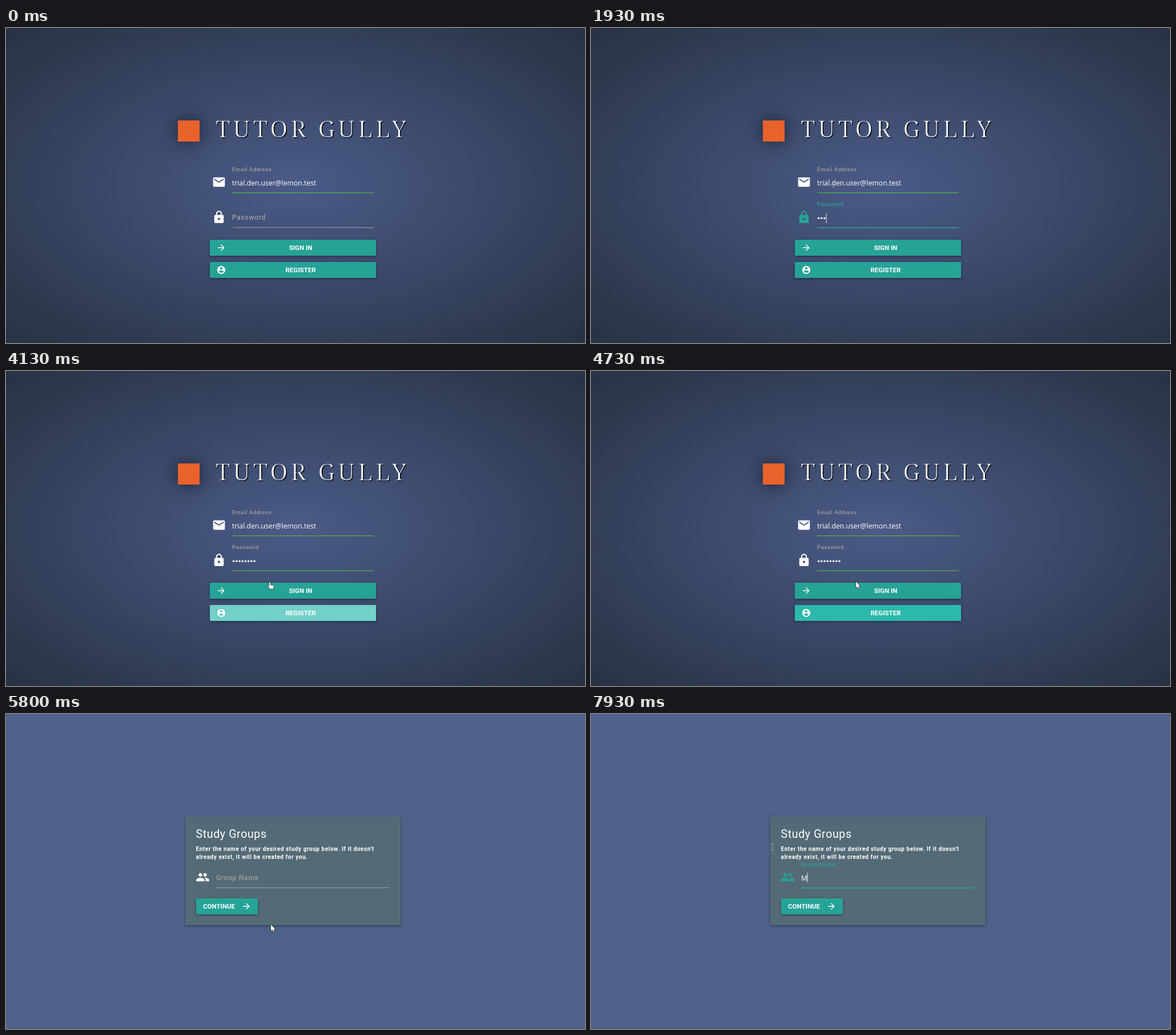
Recreate the animation shown at these times as an HTML page with a canvas. Size 1014 px wide and 552 px high, loop 8 s.

```html
<!DOCTYPE html>
<html lang="en">
<head>
<meta charset="utf-8">
<title>Sign in</title>
<style>
  html, body { margin: 0; width: 100%; height: 100%; overflow: hidden; background: #28324a; }
  canvas { display: block; }
</style>
</head>
<body>
<canvas id="stage" width="1014" height="552"></canvas>
<script>
const ctx = document.getElementById('stage').getContext('2d');
const LOOP = 8000, FOCUS = 926, TYPE = 1650, CLICK = 3700, PAGE = 5800, GROUP_FOCUS = 6700, KEY = 7930;
const WHITE = [255, 255, 255], GREY = [158, 158, 158], TEAL = [38, 163, 151], GREEN = [76, 165, 80];
const HOVER = [43, 185, 172];
const UI = '12.2px "Open Sans", sans-serif';
const LABEL = '500 12px Roboto, sans-serif';
const BUTTON = 'bold 11.5px Roboto, sans-serif';

const ICONS = {
  mail: 'M20 4H4c-1.1 0-2 .9-2 2v12c0 1.1.9 2 2 2h16c1.1 0 2-.9 2-2V6c0-1.1-.9-2-2-2zm0 4l-8 5-8-5V6l8 5 8-5v2z',
  lock: 'M18 8h-1V6c0-2.76-2.24-5-5-5S7 3.24 7 6v2H6c-1.1 0-2 .9-2 2v10c0 1.1.9 2 2 2h12c1.1 0 2-.9 2-2V10c0-1.1-.9-2-2-2zm-6 9c-1.1 0-2-.9-2-2s.9-2 2-2 2 .9 2 2-.9 2-2 2zm3.1-9H8.9V6c0-1.71 1.39-3.1 3.1-3.1s3.1 1.39 3.1 3.1v2z',
  arrow: 'M12 4l-1.41 1.41L16.17 11H4v2h12.17l-5.58 5.59L12 20l8-8z',
  account: 'M12 2C6.48 2 2 6.48 2 12s4.48 10 10 10 10-4.48 10-10S17.52 2 12 2zm0 3c1.66 0 3 1.34 3 3s-1.34 3-3 3-3-1.34-3-3 1.34-3 3-3zm0 14.2c-2.5 0-4.71-1.28-6-3.22.03-1.99 4-3.08 6-3.08s5.97 1.09 6 3.08c-1.29 1.94-3.5 3.22-6 3.22z',
  group: 'M16 11c1.66 0 3-1.34 3-3s-1.34-3-3-3-3 1.34-3 3 1.34 3 3 3zm-8 0c1.66 0 3-1.34 3-3S9.66 5 8 5 5 6.34 5 8s1.34 3 3 3zm0 2c-2.33 0-7 1.17-7 3.5V19h14v-2.5c0-2.33-4.67-3.5-7-3.5zm8 0c-.29 0-.62.02-.97.05 1.16.84 1.97 1.97 1.97 3.45V19h6v-2.5c0-2.33-4.67-3.5-7-3.5z'
};
for (const name in ICONS) ICONS[name] = new Path2D(ICONS[name]);

const POINTER = new Path2D('M0 0V11L2.5 8.7 4.2 12.6 6 11.8 4.3 8H7.6Z');
const HAND = new Path2D('M0 .8Q1-.4 2 .8V5L6.6 5.8Q8 6.2 7.8 7.6L7 11.8H1.4L-2.3 7.6Q-2.4 6-.9 6.4L0 7.2Z');

// time, x, y of the cursor's hot spot
const CURSOR = [
  [800, 425, 330], [920, 425, 330], [1000, 425, 274], [2900, 425, 274], [3270, 447, 345],
  [3500, 452, 422], [3800, 453, 422], [4130, 461, 370], [4600, 464, 369], [6300, 464, 369],
  [6650, 430, 288], [7000, 430, 288], [7400, 318, 233]
];

const clamp = v => Math.max(0, Math.min(1, v));
const easeOut = (t, start, span = 200) => 1 - (1 - clamp((t - start) / span)) ** 2;
const mix = (a, b, k) => a.map((v, i) => v + (b[i] - v) * k);
const rgb = c => `rgb(${c.map(Math.round)})`;
const blinkOn = (t, start) => t >= start && (t - start) % 1000 < 500;

function text(str, x, y, font, color, spacing = 0, align = 'left') {
  ctx.font = font;
  ctx.fillStyle = color;
  ctx.letterSpacing = spacing + 'px';
  ctx.textAlign = align;
  ctx.fillText(str, x, y);
}

// Serif lettering with its edges shaved off to give a light weight
function lightTitle(str) {
  const layer = document.createElement('canvas');
  layer.width = 400;
  layer.height = 60;
  const pen = layer.getContext('2d');
  pen.font = '42px "Noto Serif", serif';
  pen.letterSpacing = '4.8px';
  pen.fillStyle = '#fff';
  pen.fillText(str, 10, 45);
  pen.globalCompositeOperation = 'destination-out';
  pen.lineWidth = 1.3;
  pen.lineJoin = 'round';
  pen.strokeText(str, 10, 45);
  return layer;
}
const title = lightTitle('TUTOR GULLY');

function rect(x, y, w, h, color, radius = 0) {
  ctx.fillStyle = color;
  ctx.beginPath();
  ctx.roundRect(x, y, w, h, radius);
  ctx.fill();
}

function withShadow(color, blur, dx, dy, draw) {
  ctx.save();
  ctx.shadowColor = color;
  ctx.shadowBlur = blur;
  ctx.shadowOffsetX = dx;
  ctx.shadowOffsetY = dy;
  draw();
  ctx.restore();
}

function icon(name, x, y, scale, color) {
  ctx.save();
  ctx.translate(x, y);
  ctx.scale(scale, scale);
  ctx.translate(-12, -12);
  ctx.fillStyle = color;
  ctx.fill(ICONS[name]);
  ctx.restore();
}

function label(str, x, y, lift, color) {
  ctx.save();
  ctx.translate(x, y - 22.5 * lift);
  ctx.scale(1 - 0.2 * lift, 1 - 0.2 * lift);
  text(str, 0, 4.9, LABEL, color, 0.72);
  ctx.restore();
}

function dots(count, x, y, step, color) {
  ctx.fillStyle = color;
  for (let i = 0; i < count; i++) {
    ctx.beginPath();
    ctx.arc(x + i * step, y, 1.75, 0, 7);
    ctx.fill();
  }
}

function button(x, y, w, color) {
  withShadow('rgba(0,0,0,.4)', 4, 0, 1.5, () => rect(x, y, w, 28, rgb(color), 1.5));
}

function popup() {
  withShadow('rgba(0,0,0,.4)', 5, 0, 1, () => rect(396, 349, 248, 114, '#fcfcfe', 3));
  rect(396, 423, 248, 40, '#f1f2f4', [0, 0, 3, 3]);
  rect(396, 423, 248, 1, '#e4e5e8');
  rect(408, 378, 16, 16, '#e8622c');
  text('pilotbee@oak.test', 435, 380, UI, '#33353a');
  dots(12, 438.3, 397, 5.33, '#4b4d52');
  text('Manage passwords...', 408, 448, UI, '#5f6368');
}

function loginPage(t) {
  ctx.save();
  ctx.translate(507, 276);
  ctx.scale(507, 276);
  const glow = ctx.createRadialGradient(0, 0, 0, 0, 0, Math.SQRT2);
  glow.addColorStop(0, '#4b5b88');
  glow.addColorStop(1, '#273243');
  ctx.fillStyle = glow;
  ctx.fillRect(-1, -1, 2, 2);
  ctx.restore();

  withShadow('rgba(0,0,0,.6)', 32, 0, 0, () => rect(301, 162, 38, 37, '#e8622c'));
  withShadow('#000', 1, 1.5, 1.5, () => ctx.drawImage(title, 357, 147));

  label('Email Address', 396, 270, 1, rgb(GREY));
  icon('mail', 373, 270, 1.03, '#fff');
  text('trial.den.user@lemon.test', 396, 275.5, UI, '#fff');
  rect(396, 288, 248, 1.6, rgb(GREEN));

  const lift = easeOut(t, FOCUS), blur = easeOut(t, CLICK), focus = lift - blur;
  label('Password', 396, 331, lift, rgb(mix(GREY, TEAL, focus)));
  icon('lock', 373, 331.5, 1.03, rgb(mix(WHITE, TEAL, focus)));
  rect(396 + 1.5 * (1 - lift), 349.2, 248 - 2 * (1 - lift), 1 + 0.5 * lift,
    rgb(mix(mix(GREY, TEAL, lift), GREEN, blur)));

  const typed = t < TYPE ? 0 : Math.min(8, 1 + Math.floor((t - TYPE) / 120));
  dots(typed, 398.6, 333.3, 5.2, '#fff');
  const lastKey = typed ? TYPE + (typed - 1) * 120 : FOCUS;
  if (t < CLICK && blinkOn(t, lastKey)) {
    rect(396 + typed * 5.2, typed ? 325 : 323, 1, 17, '#dfe3ec');
  }

  const passing = easeOut(t, 3330, 60) - easeOut(t, 3440, 150);
  button(357, 371, 291, mix(TEAL, HOVER, passing));
  icon('arrow', 377, 385, 0.72, '#fff');
  text('SIGN IN', 516, 389, BUTTON, '#fff', 0, 'center');

  button(357, 410, 291, mix(TEAL, HOVER, easeOut(t, 3440)));
  if (t > CLICK) {
    ctx.save();
    ctx.beginPath();
    ctx.roundRect(357, 410, 291, 28, 1.5);
    ctx.clip();
    ctx.fillStyle = `rgba(255,255,255,${0.33 * (1 - clamp((t - 4130) / 600))})`;
    ctx.beginPath();
    ctx.arc(453, 424, 220 * easeOut(t, CLICK, 430), 0, 7);
    ctx.fill();
    ctx.restore();
  }
  icon('account', 377, 424, 0.7, '#fff');
  text('REGISTER', 516, 428, BUTTON, '#fff', 0, 'center');

  if (t >= 950 && t < TYPE) popup();
}

function groupPage(t) {
  rect(0, 0, 1014, 552, '#4e6289');
  withShadow('rgba(0,0,0,.4)', 4, 0, 1.5, () => rect(314, 179.5, 377, 190.5, '#546b77', 1.5));
  text('Study Groups', 332.5, 217, '19.5px Roboto, sans-serif', '#fff', 0.65);
  const body = 'bold 10px Roboto, sans-serif';
  text("Enter the name of your desired study group below. If it doesn't", 332.5, 240, body, '#fff', 0.55);
  text('already exist, it will be created for you.', 332.5, 253.5, body, '#fff', 0.55);

  const focus = easeOut(t, GROUP_FOCUS);
  label('Group Name', 368, 286, focus, rgb(mix(GREY, TEAL, focus)));
  icon('group', 344.5, 286, 1.03, rgb(mix(WHITE, TEAL, focus)));
  rect(368, 304, 303.5, 1 + 0.6 * focus, rgb(mix(GREY, TEAL, focus)));
  const typed = t >= KEY;
  if (typed) text('M', 368, 292, UI, '#fff');
  if (blinkOn(t, typed ? KEY : GROUP_FOCUS)) rect(typed ? 378.5 : 368, 278, 1, 17, '#e6eaec');

  button(333, 323, 108, TEAL);
  text('CONTINUE', 345, 341, BUTTON, '#fff');
  icon('arrow', 421, 337, 0.72, '#fff');
}

function cursor(t) {
  if (t < CURSOR[0][0]) return;
  let i = CURSOR.length - 1;
  while (CURSOR[i][0] > t) i--;
  const a = CURSOR[i], b = CURSOR[i + 1] || a;
  const k = clamp((t - a[0]) / (b[0] - a[0] || 1)), s = k * k * (3 - 2 * k);
  ctx.save();
  ctx.translate(a[1] + (b[1] - a[1]) * s, a[2] + (b[2] - a[2]) * s);
  if (t >= 3100 && t < 6500) {
    const shape = t < 4600 ? HAND : POINTER;
    ctx.lineWidth = 1.4;
    ctx.lineJoin = 'round';
    ctx.strokeStyle = '#20242e';
    ctx.stroke(shape);
    ctx.fillStyle = '#fff';
    ctx.fill(shape);
  } else {
    ctx.globalAlpha = 0.65;
    rect(-0.5, -5, 1, 10, '#b4b4b4');
    rect(-3, -5.5, 6, 1, '#b4b4b4');
    rect(-3, 4.5, 6, 1, '#b4b4b4');
  }
  ctx.restore();
}

function frame() {
  const t = performance.now() % LOOP;
  (t < PAGE ? loginPage : groupPage)(t);
  cursor(t);
  requestAnimationFrame(frame);
}
frame();
</script>
</body>
</html>
```
